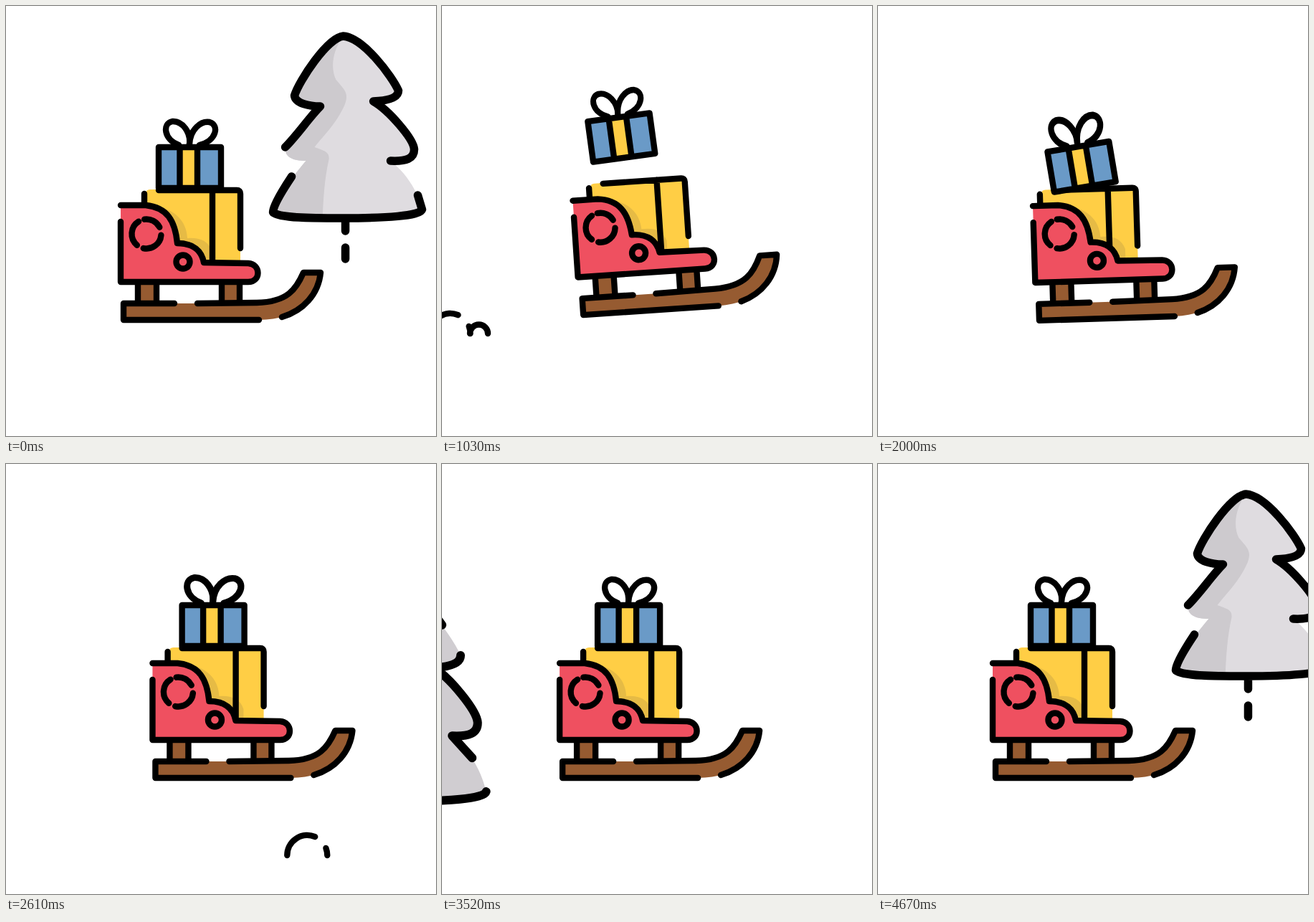
An HTML page that plays this animation: 600 px wide and 600 px high, repeating every 4.7 s.

```html
<!DOCTYPE html>
<html lang="en">
<head>
<meta charset="utf-8">
<title>Sled ride</title>
<style>
html, body { margin: 0; width: 100%; height: 100%; overflow: hidden; background: #fff; }
svg { display: block; width: 100vw; height: 100vh; }
.ln { fill: none; stroke: #000; stroke-width: 8.4; stroke-linecap: round; stroke-linejoin: round; }
.tree .ln { vector-effect: non-scaling-stroke; }
.red { fill: #ef5060; } .gold { fill: #ffce45; } .wood { fill: #965b31; }
</style>
</head>
<body>
<svg viewBox="0 0 600 600">
  <defs>
    <clipPath id="inBox"><rect id="boxClip" x="195" y="256" width="132" height="100"/></clipPath>
    <clipPath id="inTree"><path id="treeClip"/></clipPath>
  </defs>
  <g id="trees"></g>
  <g id="bumps"></g>
  <g id="sled">
    <path id="box" class="gold" d="M195 262Q195 256 201 256H327V356H195Z"/>
    <g clip-path="url(#inBox)">
      <path fill="#e6bb45" d="M190 278C235 278 252 300 253 324C270 323 282 327 287 342V360H190Z"/>
    </g>
    <path id="boxLines" class="ln" d="M213 257H322Q327 257 327 262V338M288 257V357M193 262V280"/>
    <path class="wood" d="M184 387H211V415H184ZM301 387H326V415H301Z"/>
    <path class="ln" d="M184 387V415M210 387V415M301 387V415M326 387V415"/>
    <path class="wood" d="M164 415H350C393 413 405 395 415 372H439C436 405 410 438 353 438H164Z"/>
    <path class="ln" d="M235 415H164V438H353M385 434C415 425 436 402 439 372H415C405 395 393 413 350 414L267 415"/>
    <path class="red" d="M160 278H195C225 281 236 300 239 331C262 331 273 342 276 358L338 359C355 360 355 385 338 385H160Z"/>
    <path class="ln" d="M160 278H195C225 281 236 300 239 331C262 331 273 342 276 358L338 359C356 360 356 385 338 385H160V301"/>
    <path id="ring" class="ln"/>
    <circle class="ln" cx="247" cy="357" r="9.5"/>
  </g>
  <g id="gift">
    <g id="bow" class="ln" style="fill:#fff">
      <path d="M256 193C258 176 246 160 232 161C218 164 220 186 241 194"/>
      <path d="M256 193C257 172 272 160 284 162C298 166 294 188 270 194"/>
    </g>
    <path fill="#6a9ac7" d="M213 197H300V254H213Z"/>
    <path class="gold" d="M242 197H267V254H242Z"/>
    <path class="ln" d="M213 197H300V254H213ZM242.5 197V254M267 197V254"/>
  </g>
</svg>
<script>
const LOOP = 4700, BEAT = 405;
const $ = id => document.getElementById(id);
const set = (el, t) => el.setAttribute('transform', t);

function add(parent, tag, attrs) {
  const el = document.createElementNS('http://www.w3.org/2000/svg', tag);
  for (const k in attrs) el.setAttribute(k, attrs[k]);
  return parent.appendChild(el);
}

function arc(cx, cy, r, from, to) {
  const p = a => [cx + r * Math.cos(a * Math.PI / 180), cy + r * Math.sin(a * Math.PI / 180)];
  return `M${p(from)}A${r} ${r} 0 0 1 ${p(to)}`;
}

// Motion helpers: progress, smooth ramp, single arch, ramp up and back down
const part = (t, a, b) => Math.min(1, Math.max(0, (t - a) / (b - a)));
const ease = (t, a, b) => { const u = part(t, a, b); return u * u * (3 - 2 * u); };
const hop = (t, a, b) => Math.sin(Math.PI * part(t, a, b));
const swell = (t, a, b, c, d) => ease(t, a, b) - ease(t, c, d);

$('ring').setAttribute('d', arc(196, 318, 20.5, -98, -27) + arc(196, 318, 20.5, 5, 102) + arc(196, 318, 20.5, 130, 238));

// Tree outline pieces, clockwise from the lower left branch
const SIDE = 'M391 197C408 180 425 155 440 140C425 140 405 136 404 125';
const CAP = 'C410 105 450 44 472 42';
const TIP = 'C500 44 540 98 549 118', NOTCH = 'C549 128 535 132 514 133';
const MID = 'C535 145 570 185 571 200', HOOK = 'C571 213 560 217 538 216';
const SKIRT = 'C558 232 575 255 582 284';
const BASE = 'C580 293 530 296 472 296C440 296 385 297 374 288';
const RISE = 'C374 278 395 245 420 216C400 216 390 210 391 197';
const FOOT = 'C374 278 390 253 400 238';
const SHAPE = SIDE + CAP + TIP + NOTCH + MID + HOOK + SKIRT + BASE + RISE + 'Z';
const SHADE = 'M472 42C455 65 455 90 462 103C475 118 480 122 474 138C462 165 445 180 432 197' +
  'C445 202 453 203 452 214C446 240 444 270 443 300H360V42Z';
$('treeClip').setAttribute('d', SHAPE);

const trees = [
  { at: 0, x: 472, y: 42, v: 1.43, sx: 1, sy: 1, w: 11.5, light: '#dfdce0', dark: '#cdcace',
    d: SIDE + CAP + TIP + NOTCH + MID + HOOK + 'M576 264L582 284' + BASE + FOOT + 'M475 302V314M475 337V353' },
  { at: 1330, x: 40.5, y: 81, v: 2.46, sx: 0.74, sy: 0.745, w: 8.4, light: '#dfdce0', dark: '#cdcace',
    d: SIDE + 'C406 110 425 80 440 61M472 42' + TIP + NOTCH + MID + HOOK + SKIRT + 'L561 289' +
      'M504 296H472C440 296 385 297 374 288' + RISE + 'M475 296V353' },
  { at: 3520, x: -55.5, y: 180, v: 1.68, sx: 1.08, sy: 1.145, w: 12, light: '#d0cdd1', dark: '#c2bfc3',
    d: SIDE + CAP + 'C490 44 510 60 525 81M549 118' + NOTCH + MID + HOOK + 'L564 243M582 284' + BASE + FOOT + 'M475 296V353' }
];
for (const k of trees) {
  k.el = add($('trees'), 'g', { class: 'tree' });
  add(k.el, 'path', { d: SHAPE, fill: k.light });
  add(k.el, 'path', { d: SHADE, fill: k.dark, 'clip-path': 'url(#inTree)' });
  add(k.el, 'path', { d: k.d, class: 'ln', style: `stroke-width:${k.w}px` });
}

// Three snow bumps under the sled on a steady beat, then one in the foreground
const MOUND = arc(0, 0, 28, 180, 293) + arc(0, 0, 28, 339, 360);
const PAIR = MOUND + arc(40, 0, 12.5, 180, 360);
const beats = [-1, 0, 1].map(i => 1330 + i * BEAT);
const bumps = beats.map(at => ({ at, x: 223.5, y: 457, v: 2, d: PAIR }));
bumps.push({ at: 2610, x: 422, y: 546, v: 1.7, d: MOUND });
for (const b of bumps) b.el = add($('bumps'), 'path', { d: b.d, class: 'ln' });

// Steady scroll to the left, wrapped to the nearest pass
function passX(o, t) {
  const dt = t - o.at;
  return o.x - o.v * (dt - LOOP * Math.round(dt / LOOP));
}

function draw(t) {
  for (const k of trees)
    set(k.el, `translate(${passX(k, t)} ${k.y}) scale(${k.sx} ${k.sy}) translate(-472 -42)`);
  for (const b of bumps) set(b.el, `translate(${passX(b, t)} ${b.y})`);

  // Sled: surges ahead, lifts on every bump, drifts back
  const lift = beats.reduce((sum, at) => sum + hop(t, at - BEAT / 2, at + BEAT / 2), 0);
  const x = 56 * swell(t, 650, 1530, 2120, 3800);
  const tilt = -2.55 * swell(t, 450, 690, 1860, 2250) - 1.9 * lift;
  const pose = `translate(${x} ${-12.7 * lift}) rotate(${tilt} 195 278)`;
  set($('sled'), pose);

  // Box lags behind the sled
  const slide = -23 * swell(t, 800, 1330, 1900, 3350);
  set($('box'), `translate(${slide} 0)`);
  set($('boxLines'), `translate(${slide} 0)`);
  $('boxClip').setAttribute('x', 195 + slide);

  // Gift is tossed twice and tips backwards
  const gx = -49 * swell(t, 850, 1330, 1400, 2130);
  const gy = -30 * hop(t, 830, 1250) - 42 * hop(t, 1250, 1990);
  const spin = -12.2 * swell(t, 850, 1330, 1830, 2250);
  set($('gift'), `translate(${gx} ${gy}) ${pose} translate(${slide} 0) rotate(${spin} 256.5 225.5)`);

  const wide = 1 - 0.05 * hop(t, 700, 1990) + 0.09 * hop(t, 2000, 3220);
  const tall = 1 + 0.15 * hop(t, 1100, 2900);
  set($('bow'), `translate(256 194) scale(${wide} ${tall}) translate(-256 -194)`);
}

function tick() {
  draw(performance.now() % LOOP);
  requestAnimationFrame(tick);
}
tick();
</script>
</body>
</html>
```
